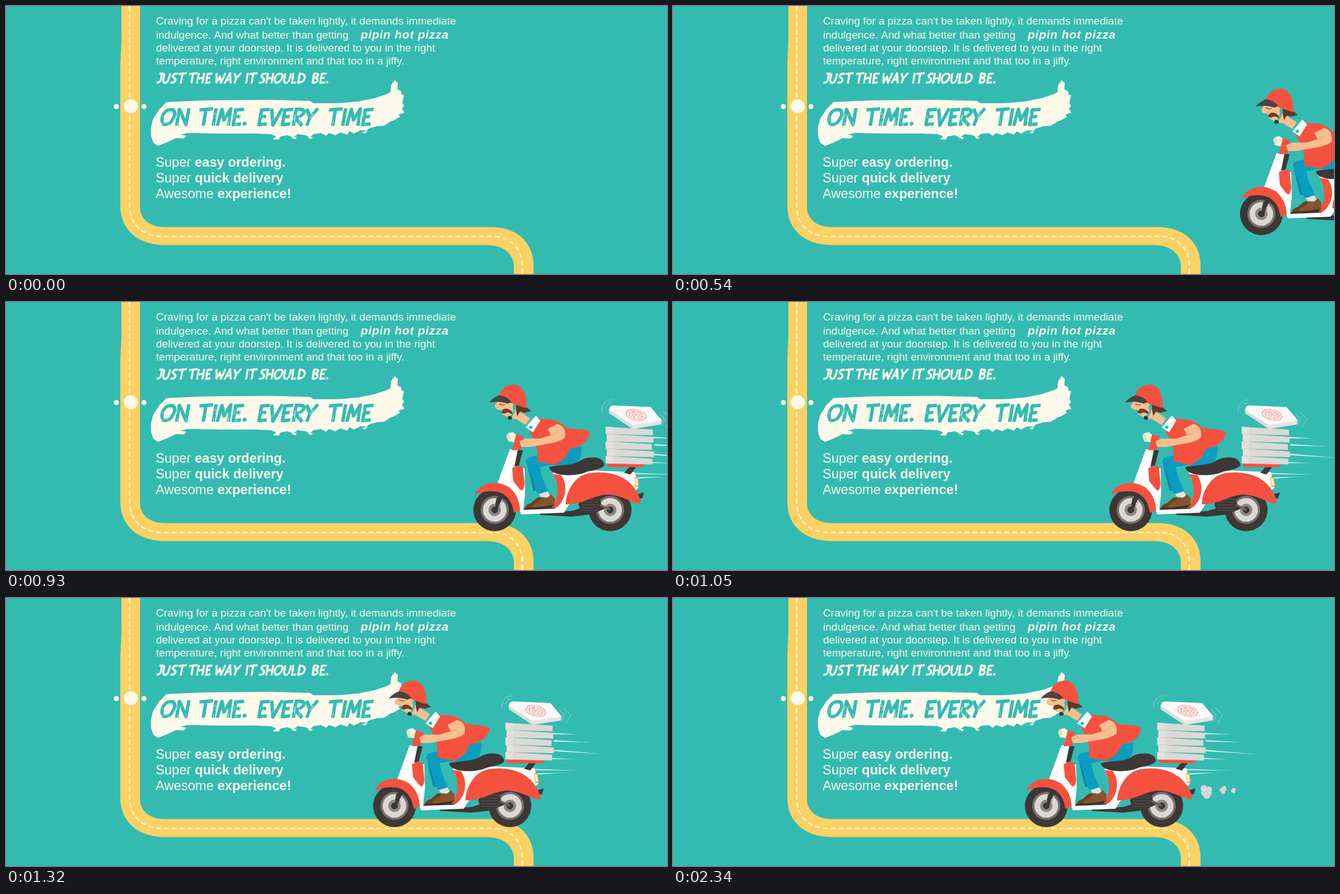
An HTML page with a canvas for the animation above (4510 ms loop, 1174 by 477 pixels).

```html
<!DOCTYPE html>
<html lang="en">
<head>
<meta charset="utf-8">
<title>Pizza delivery</title>
<style>
html, body { margin: 0; width: 100%; height: 100%; overflow: hidden; background: #33bbb2; }
canvas { display: block; }
</style>
</head>
<body>
<canvas id="stage" width="1174" height="477"></canvas>
<script>
const ctx = document.getElementById('stage').getContext('2d');
const LOOP = 4510;
const TEAL = '#33bbb2', CREAM = '#fef9ea', ROAD = '#fdd164', RED = '#f4523f';
const DARK = '#3d3735', WHITE = '#ffffff', SKIN = '#f6bf90', BLUE = '#0b9cc1';
const BROWN = '#86552f', HAIR = '#5b3a29', GREY = '#dad8d4';
const SANS = '"Liberation Sans", Arial, sans-serif';

function fill(color, d) {
  ctx.fillStyle = color;
  ctx.fill(new Path2D(d));
}

function line(color, width, d, dash = []) {
  ctx.strokeStyle = color;
  ctx.lineWidth = width;
  ctx.setLineDash(dash);
  ctx.stroke(new Path2D(d));
  ctx.setLineDash([]);
}

function dot(color, x, y, rx, ry = rx) {
  ctx.fillStyle = color;
  ctx.beginPath();
  ctx.ellipse(x, y, rx, ry, 0, 0, Math.PI * 2);
  ctx.fill();
}

function write(str, x, y, font, spacing = 0) {
  ctx.font = `${font} ${SANS}`;
  ctx.letterSpacing = spacing + 'px';
  ctx.fillStyle = CREAM;
  ctx.fillText(str, x, y);
  const w = ctx.measureText(str).width;
  ctx.letterSpacing = '0px';
  return x + w;
}

function seeded(seed) {
  return () => (seed = (seed * 16807) % 2147483647) / 2147483647;
}

// Brush lettering: strokes on a 30-unit cap height, with the advance.
const GLYPHS = {
  J: ['M5 2H16M12 1V20Q11 29 1 27', 17],
  U: ['M2 1V20Q3 29 10 28Q18 27 18 1', 22],
  S: ['M18 3Q8 0 5 8Q5 12 11 15Q17 20 13 25Q9 29 1 27', 20],
  T: ['M0 3L23 1M11 2V30', 25],
  H: ['M2 0V30M17 0V30M2 16L17 14', 23],
  E: ['M18 2L4 3V28L17 27M4 15L14 14', 20],
  W: ['M1 1L5 28L12 10L18 28L26 0', 28],
  A: ['M0 30L11 1L18 30M5 20L17 19', 22],
  Y: ['M1 1L9 16L20 0M9 15L6 30', 22],
  I: ['M3 0V30', 8],
  O: ['M12 2C3 4 -1 12 2 22C5 31 15 29 19 20C24 9 21 0 10 3', 26],
  N: ['M2 30V2L18 28V0', 24],
  M: ['M2 30L5 2L12 20L20 1L21 30', 25],
  V: ['M1 1L8 29L19 0', 20],
  R: ['M3 30V2Q18 0 17 8Q15 14 4 16L18 30', 20],
  L: ['M3 0V28L15 27', 18],
  D: ['M3 2V28Q20 26 19 13Q18 2 1 2', 23],
  B: ['M3 2V28Q17 28 16 20Q15 15 4 14Q17 12 15 5Q12 1 1 2', 21],
  '.': ['M1 24L5 29', 9]
};

function brushWord(word, x, y, scale, ink, paper) {
  const rnd = seeded(word.length * 977 + Math.round(x));
  ctx.save();
  ctx.translate(x, y);
  ctx.transform(scale, 0, -0.17 * scale, scale, 4 * scale, 0);
  ctx.lineJoin = 'round';
  let width = 0;
  ctx.save();
  for (const ch of word) {
    const [d, advance] = GLYPHS[ch];
    line(ink, 5.8, d);
    ctx.translate(advance, 0);
    width += advance;
  }
  ctx.restore();
  // dry bristle streaks
  for (let i = 0; i < width / 4; i++) {
    const sx = rnd() * width, sy = 8 + rnd() * 20, len = 3 + rnd() * 6;
    line(paper, 0.6, `M${sx} ${sy}l${rnd() - 0.5} ${len}`);
  }
  ctx.restore();
}

function drawRoad() {
  fill(ROAD, 'M205 0V60L203 105V355C203 400 236 425.5 282 425.5H858C886 427 902 443 902 463V477H937V462C937 420 906 393.5 862 393.5H282C255 393 238 380 238 357V0Z');
  line('#fffaf0', 2, 'M219.5 0V358C220 390 245 410 275 410H865C896 410 917 432 917 462V477', [9, 5]);
  dot(CREAM, 221.5, 178.5, 12.5);
  dot(CREAM, 196, 179, 4.5);
  dot(CREAM, 245, 179, 4.5);
}

function drawBanner() {
  fill(CREAM, 'M270 249L262 244L258 233L257 218L261 202L272 184L285 171L350 168L470 167L540 169L546 173L590 173L625 170L655 164L676 157L683 153L684 141L690 132L696 137L695 148L702 152L702 157L707 159L704 172L707 178L703 183L708 190L697 193L700 197L690 203L682 206L672 213L658 214L645 218L640 222L630 221L618 227L610 223L606 229L594 225L585 230L574 226L568 231L560 226L546 228L540 234L532 230L518 228L510 234L500 230L488 232L484 238L474 237L480 232L470 228L440 227L380 227L322 226L310 229L320 231L316 236L302 235L285 243Z');
  fill(CREAM, 'M506 235l10 -2 -1 4ZM536 233l10 1 -6 3ZM632 225l10 -3 -4 5Z');
}

function drawCopy() {
  const body = '19.1px';
  write("Craving for a pizza can't be taken lightly, it demands immediate", 266.5, 33, body);
  write('indulgence. And what better than getting', 266.5, 58, body);
  write('pipin hot pizza', 630, 58, 'italic bold 21px', 0.7);
  write('delivered at your doorstep. It is delivered to you in the right', 266.5, 81, body);
  write('temperature, right environment and that too in a jiffy.', 266.5, 104, body);

  const tagline = { JUST: 267, THE: 323, WAY: 371, IT: 425, SHOULD: 449, 'BE.': 543 };
  for (const word in tagline) brushWord(word, tagline[word], 119, 0.63, CREAM, TEAL);
  [['ON', 275], ['TIME.', 340], ['EVERY', 446], ['TIME', 570]]
    .forEach(([word, x]) => brushWord(word, x, 182, 1.04, TEAL, CREAM));

  [['Super ', 'easy ordering.'], ['Super ', 'quick delivery'], ['Awesome ', 'experience!']]
    .forEach(([light, bold], i) => {
      const x = write(light, 265.7, 286 + i * 28, '23.6px');
      write(bold, x, 286 + i * 28, 'bold 23.6px');
    });
}

function drawWheel(x) {
  dot(DARK, x, 370, 38);
  dot('#79726e', x, 370, 25);
  dot(GREY, x, 370, 21);
  dot('#8e8883', x, 370, 11);
  dot(DARK, x, 370, 6);
}

function drawBoxes() {
  fill(RED, 'M862 287L928 288Q930 294 924 294L866 294Q862 293 862 287Z');
  fill(DARK, 'M902 294L914 294L904 307L893 304Z');
  for (let i = 4; i >= 0; i--) {
    const x = 860 + (i % 2) * 2, y = 222 + i * 13;
    const right = x + 84 - (i % 3);
    fill('#dbd9d5', `M${x} ${y}L${right} ${y + 5}V${y + 15}L${x} ${y + 13}Z`);
    fill('#e3e1de', `M${x} ${y}l13 1v13l-13 -1Z`);
    line('#cfcdc9', 0.8, `M${x} ${y + 13}L${right} ${y + 15}`);
  }
  fill('#dddbd7', 'M866 190L908 218V226L866 198Z');
  fill('#e6e5e2', 'M908 218L960 211L958 218L908 226Z');
  fill('#fbfaf8', 'M868 186L873 184L940 187L960 211L908 219L866 192Z');

  // pizza printed on the lid
  ctx.save();
  ctx.translate(914, 201);
  ctx.transform(1, 0.08, 0.15, 0.58, 0, 0);
  const pink = '#f8b3ac';
  line(pink, 2.5, 'M17 0A17 17 0 1 1 -17 0A17 17 0 1 1 17 0M12 0A12 12 0 1 1 -12 0A12 12 0 1 1 12 0');
  line(pink, 2, 'M-12 -5L13 5M-7 11L7 -11M0 0L-2 -13');
  [[-6, 2], [3, 7], [-4, -7], [7, -2]].forEach(([x, y]) => dot(pink, x, y, 2.2));
  ctx.restore();

  line('#74cfc8', 1.2, 'M854 195C853 182 861 174 873 174M860 190C861 183 865 180 871 179M956 199L965 209L958 221M963 195L976 208L967 223');
}

function drawSpeedLines() {
  const streaks = [
    [944, 240, 990, 243], [946, 253, 1013, 257], [944, 270, 1036, 278],
    [928, 284, 985, 287], [905, 304, 992, 307], [915, 312, 962, 311]
  ];
  for (const [x1, y1, x2, y2] of streaks) {
    fill('#d5f0ec', `M${x1} ${y1}L${x2} ${y2}L${x1} ${y1 + 2.4}Z`);
  }
}

function drawScooter() {
  drawWheel(663);
  drawWheel(868);
  // engine and exhaust
  fill(DARK, 'M740 375L800 372L850 356L858 368L835 378L800 382L745 379Z');
  dot(DARK, 832, 360, 20, 16);
  for (let y = 351; y < 373; y += 5) line('#5c5552', 1, `M817 ${y}H848`);
  line('#6a6360', 4, 'M850 361L868 370');
  fill(DARK, 'M902 346L928 339L925 349L903 354Z');
  // white bodywork
  fill(WHITE, 'M690 262L706 263L700 294L716 296L717 340L714 367L768 366L780 340L766 304L845 300L912 303L918 331L905 342L840 330L794 362L786 375L710 378L704 360L690 330L668 322Z');
  fill(DARK, 'M704 263L713 264L706 291L698 293Z');
  fill(RED, 'M694 296Q704 290 713 293L716 322Q715 341 707 333L696 319Z');
  fill(DARK, 'M715 367L770 360L776 363L768 368L714 370Z');
  fill(RED, 'M766 306L781 308C793 325 791 350 774 365L764 367C777 350 779 328 766 306Z');
  fill(RED, 'M789 358C791 335 806 306 836 304C868 300 908 310 922 352L921 359C905 357 893 346 868 343C844 340 815 363 789 360Z');
  fill('#f9a15f', 'M911 312L917 312L920 328L913 330Z');
  fill('#fff1b8', 'M912 314L916 314L918 326L914 328Z');
  // front fender and fork
  line(DARK, 6, 'M673 347L666 367');
  line('#77706c', 1.2, 'M668 354l8 3M666 359l8 3');
  fill(RED, 'M628 342C634 328 650 320 668 322C692 326 707 344 708 371L697 375C694 355 684 338 661 337C646 336 636 340 628 343Z');
  fill(DARK, 'M666 350L672 344L678 347L670 362L664 360Z');
}

function drawRider() {
  // legs and shoes
  fill('#0a86a8', 'M721 290L734 290L744 335L732 336Q727 318 721 290Z');
  fill(BLUE, 'M719 284Q719 277 730 275L786 262L817 257Q819 280 806 288L789 293L764 290L743 294L747 312L758 337L742 343Q733 335 731 316Z');
  fill('#e4e2df', 'M741 342L757 337L762 346L748 349Z');
  fill('#6b4022', 'M717 366Q719 360 727 358L739 348L748 348L750 364L728 367Z');
  fill(BROWN, 'M729 364Q733 358 742 355L748 347L756 349L763 342L770 350L769 361L754 363L732 366Z');
  line('#4b2b15', 1.2, 'M717 367L752 365L770 361');
  // seat
  fill(DARK, 'M760 294C770 290 798 292 812 284C828 273 856 273 858 290C854 298 838 298 825 303C808 310 768 312 760 296Z');
  // neck, face
  fill(SKIN, 'M668 177L692 177L706 194L726 207L718 219L700 208Q689 209 683 203L676 200L675 192Q664 192 663 186Q664 181 668 177Z');
  fill(HAIR, 'M699 182L719 187L728 194L716 197L708 195L703 203Z');
  line('#70402a', 1.2, 'M671 181Q676 185 681 182');
  fill('#70402a', 'M675 197Q676 188 686 190Q695 193 696 202Q690 196 684 197Q680 200 675 197Z');
  dot(DARK, 690, 206, 4, 3.5);
  line(TEAL, 3, 'M698 181L697 196L692 204');
  dot(TEAL, 698, 187, 3, 5);
  // helmet
  fill(RED, 'M670 168C674 153 686 146 699 147C714 149 722 169 719 189L690 179Z');
  fill('#4b4340', 'M653 179Q660 170 671 166Q684 167 693 178L686 181Q670 175 653 179Z');
  // shirt and arm
  fill(RED, 'M738 207L768 210Q781 214 790 224L826 228L832 233Q830 246 815 256L797 261L788 278L770 290L739 284Q741 262 733 246L725 231Z');
  fill(WHITE, 'M718 223L736 202L744 211L731 232Z');
  line('#dedbd7', 1, 'M729 224L741 208');
  dot(TEAL, 727, 223, 3);
  fill('#f7f2df', 'M684 238Q686 231 696 232L703 238L700 250L687 248Z');
  fill('#e5dec4', 'M684 240Q686 233 690 233L691 248L687 247Z');
  fill(RED, 'M701 236L714 238L709 263L694 264Z');
  fill(SKIN, 'M757 226L774 217Q790 221 788 240Q784 247 765 251L726 258L710 258L707 248L718 243L744 243L763 237Z');
  line('#dc9e70', 1, 'M763 237Q771 236 774 231M711 250L720 248');
}

function puff(...balls) {
  for (const [x, y, r] of balls) dot(GREY, x, y, r);
}

function drawSmoke(t) {
  if (t >= 1410) puff([943, 339, 6], [952, 341, 5.5], [948, 351, 6.5], [942, 347, 4], [953, 347, 4]);
  if (t >= 1860) puff([974, 341, 3.2], [979, 338, 3.6], [977, 345, 3.8], [981, 341, 2.2]);
  if (t >= 2340) puff([993.5, 343, 2.5], [996, 341, 3], [996, 345, 2.6]);
}

function draw(t) {
  ctx.fillStyle = TEAL;
  ctx.fillRect(0, 0, 1174, 477);
  drawRoad();
  drawBanner();
  drawCopy();
  if (t < 180) return;
  // steady ride in from the right: 40 steps of 30 ms
  const step = Math.min(40, Math.floor((t - 180) / 30));
  ctx.save();
  ctx.translate(Math.round((40 - step) * 13.64), 0);
  drawSpeedLines();
  drawScooter();
  drawBoxes();
  drawRider();
  ctx.restore();
  drawSmoke(t);
}

const start = performance.now();
function tick() {
  draw((performance.now() - start) % LOOP);
  requestAnimationFrame(tick);
}
tick();
</script>
</body>
</html>
```
